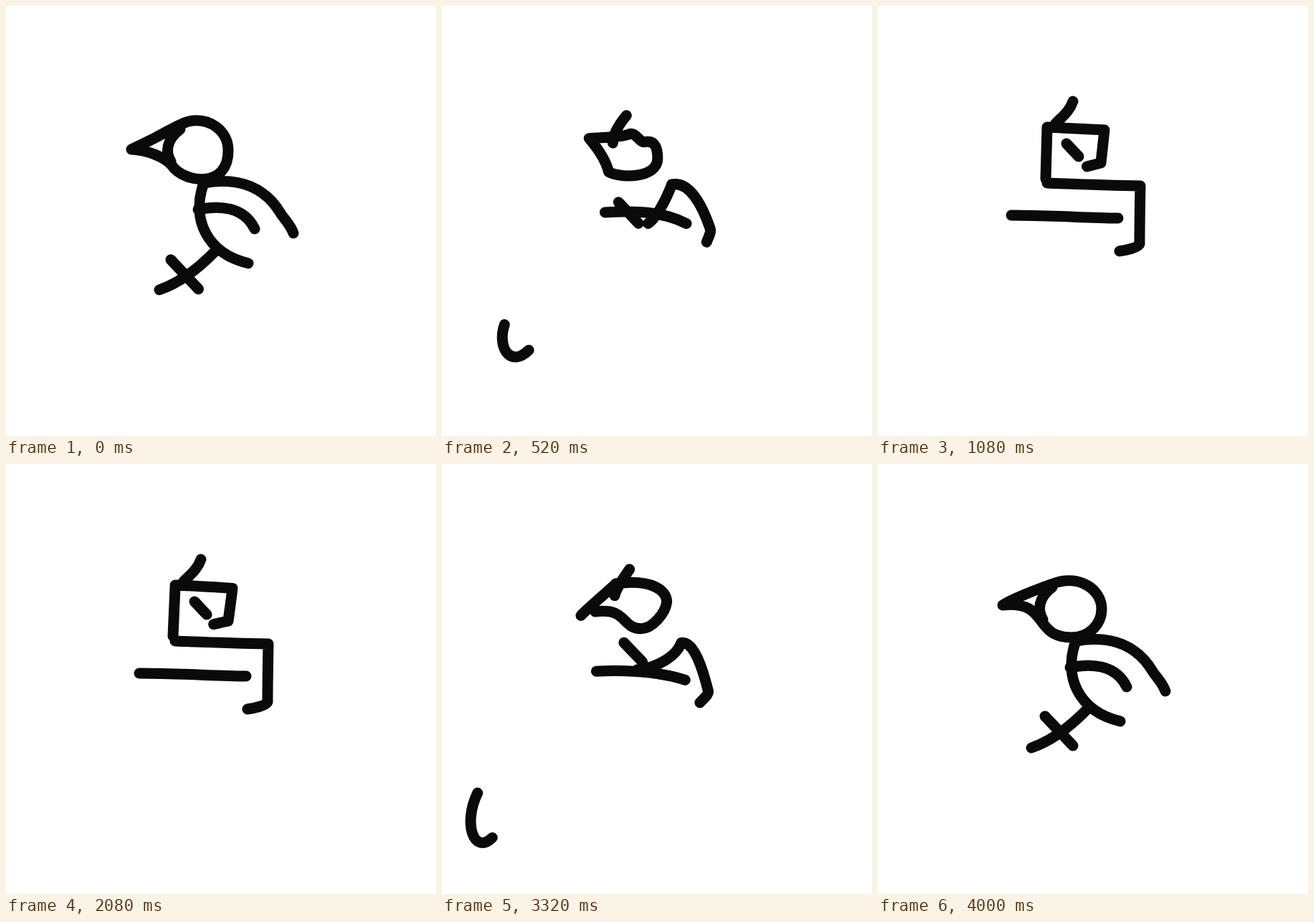
Animation, 600 px wide and 600 px high, one loop 4520 ms. Source, as an HTML page:

```html
<!DOCTYPE html>
<html lang="en">
<head>
<meta charset="utf-8">
<title>Bird and character</title>
<style>
  html, body { margin: 0; width: 100%; height: 100%; overflow: hidden; background: #fff; }
  svg { display: block; width: 100%; height: 100%; }
  path { fill: none; stroke: #0a0a0a; stroke-width: 15; stroke-linecap: round; stroke-linejoin: round; }
</style>
</head>
<body>
<svg id="stage" viewBox="0 0 600 600"></svg>
<script>
const LOOP = 4520, STEP = 40;
const FORM = 1050, STIR = 2050, LEAVE = 2955, LAND = 3975;
const OPEN_HEAD = 1080;

// A straight line written as a cubic, like every other stroke.
const line = (a, b) => `M${a}C${a} ${b} ${b}`;

const numbers = path => path.match(/-?[\d.]+/g).map(Number);

const headClosed = [
  [0, 'M310 201 C310 175 285 155 255 161 C242 164 224 176 206 185 C192 192 175 200 175 200 ' +
      'C197 201 222 211 231 222 C249 248 311 255 310 201'],
  [FORM, 'M291.5 224 C291.5 224 311 219 311 219 C311 219 316 173 316 173 C316 173 236 169 236 169 ' +
         'C235 193 235 217 234 241 C253 235 291.5 224 291.5 224']
];

const headOpen = [
  [STIR, 'M291.5 224 C291.5 224 311 219 311 219 C312.5 204 314.5 188 316 173 ' +
         'C316 173 236 169 236 169 C236 169 234 241 234 241'],
  [LEAVE, 'M236 211 C269 206 269 221 281 223 C293 224 311.5 199.5 314.5 187.5 ' +
          'C315.5 177.5 300 163.5 240 167.5 C235 177.5 210 210.5 205 219.5'],
  [LAND, 'M174 197 C240 190 215 242 270 242 C293 242 312 225 312 202 ' +
         'C312 176 282 154 247 166 C235 170 189 187 174 197']
];

const crossbar = [
  [0, line([230, 354], [268.5, 395])],
  [FORM, line([263, 192], [280, 210])],
  [STIR, line([263, 192], [280, 210])],
  [LEAVE, line([265.5, 192], [284, 211])],
  [LAND, line([233, 352], [272, 393])]
];

// Strokes that leave the bird and return to the same pose.
const there = (bird, glyph) => [[0, bird], [FORM, glyph], [LEAVE, glyph], [LAND, bird]];

const face = there(
  'M243 172 C224 186 222 204 230 217',
  'M272 133 C267 148 255 156 247 165');
const body = there(
  'M338 359 C280 345 258 297 276 247 C326 238 362 254 383 289 C388 297 397 305 401 317',
  'M236 247 C314 250 366 251 366 251 C366 251 365 305 365 332 C364 337 345 341 337 342');
const wing = there(
  'M268 284 C298 278 332 280 347 311',
  'M186 292 C248 292 290 296 335 296');
const leg = there(
  'M293 341 C265 370 238 388 214 396',
  'M-54 622 C-78 644 -88 566 -42 494');

const parse = keys => keys.map(([time, path]) => ({ time, nums: numbers(path) }));

function pose(keys, t) {
  const last = keys.length - 1;
  let i = 0;
  while (i < last - 1 && t >= keys[i + 1].time) i++;
  const a = keys[i], b = keys[i + 1];
  const k = Math.min(1, Math.max(0, (t - a.time) / (b.time - a.time)));
  const n = a.nums.map((v, j) => (v + (b.nums[j] - v) * k).toFixed(2));
  return `M${n[0]} ${n[1]}C${n.slice(2).join(' ')}`;
}

const stage = document.getElementById('stage');
function addStroke(pick) {
  const el = document.createElementNS(stage.namespaceURI, 'path');
  stage.append(el);
  return t => el.setAttribute('d', pick(t));
}

const closed = parse(headClosed), open = parse(headOpen);
const strokes = [
  addStroke(t => t < OPEN_HEAD ? pose(closed, t) + 'Z' : pose(open, t)),
  ...[crossbar, face, body, wing, leg].map(parse).map(keys => addStroke(t => pose(keys, t)))
];

function draw(ms) {
  const t = Math.floor((ms % LOOP) / STEP) * STEP;
  strokes.forEach(stroke => stroke(t));
}

const start = performance.now();
function tick() {
  draw(performance.now() - start);
  requestAnimationFrame(tick);
}
tick();
</script>
</body>
</html>
```
